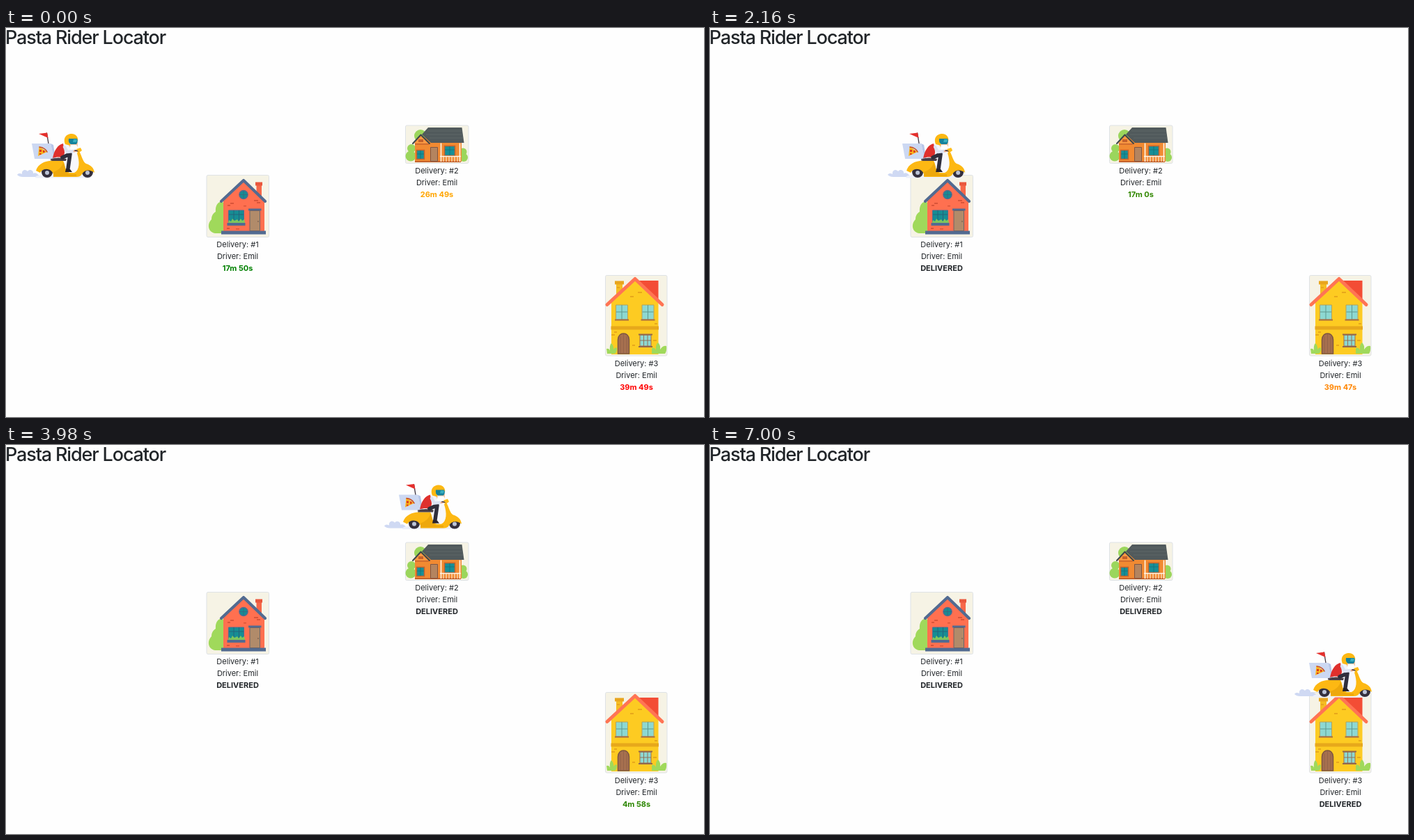
Animation, 1002 px wide and 559 px high, one loop 7350 ms. Source, as an HTML page:

```html
<!DOCTYPE html>
<html lang="en">
<head>
<meta charset="utf-8">
<title>Pasta Rider Locator</title>
<style>
html, body { margin: 0; width: 100%; height: 100%; overflow: hidden; background: #fefefe; }
svg { display: block; width: 1002px; height: 559px; }
text { font: 11px Inter, "Open Sans", sans-serif; fill: #212529; text-anchor: middle; }
#title { font-size: 27px; font-weight: 500; letter-spacing: -1.15px; text-anchor: start; }
.status { font-weight: 700; }
.card { fill: #f6f3e5; stroke: #dee2e6; }
.line { fill: none; stroke-linecap: round; stroke-linejoin: round; }
</style>
</head>
<body>
<svg viewBox="0 0 1002 559">
  <text id="title" x="-1" y="23">Pasta Rider Locator</text>

  <g id="house1">
    <rect class="card" x="288" y="211.500" width="89.500" height="89" rx="2"/>
    <path fill="#a0d95b" d="M300 295C290 293 288 282 295 275C295 269 298 266 301 264C300 255 305 248 311 250L315 255V295Z"/>
    <path fill="#f76849" d="M359.500 226H367V245L359.500 239Z"/>
    <path fill="#e9573c" d="M358 221.500h10v5h-10Z"/>
    <path fill="#ff7050" d="M312 293V247L341 219L371 247V293Z"/>
    <path class="line" stroke="#526b91" stroke-width="4.200" stroke-linecap="butt" d="M309 249L341 219L372 249"/>
    <circle cx="341" cy="239.500" r="6" fill="#168d94" stroke="#526b91" stroke-width="1.600"/>
    <path stroke="#3c6580" stroke-width=".8" d="M341 234v11M335 239.500h12"/>
    <path fill="#168d94" stroke="#526b91" d="M319.500 262h22v18h-22Z"/>
    <path stroke="#23647a" stroke-width="1" d="M327 262v18M334.500 262v18M320 268h21"/>
    <path fill="#7fc65c" d="M319 280l1-4 3 2 2-4 3 3 4-2 2 3 3-4 2 3 3-2 1 5Z"/>
    <path fill="#526b91" d="M317.500 280h26v4h-26ZM348 259.500h18.500v3h-18.500ZM309 291.500h64v5h-64Z"/>
    <path fill="#b18b6a" stroke="#6c6267" d="M350 262.500h14.500v29H350Z"/>
    <path fill="#d9553a" d="M322 251h5v2h-5ZM318 254h4v2h-4ZM356 247h6v2h-6ZM360 250h5v2h-5ZM330 288h5v1.500h-5ZM317 287h4v2h-4ZM341 255h4v1.500h-4Z"/>
    <circle cx="362" cy="278" r=".8" fill="#5d4b44"/>
  </g>

  <g id="house2">
    <rect class="card" x="573.500" y="140" width="90.500" height="54.500" rx="2"/>
    <g fill="#9bd65c">
      <circle cx="595" cy="155" r="9"/><circle cx="582" cy="173" r="6"/>
      <circle cx="581" cy="184" r="7.500"/><circle cx="656" cy="178" r="5.500"/><circle cx="657" cy="186" r="6"/>
    </g>
    <path fill="#f18a32" d="M587 192V164L595 154L610 162H654V192Z"/>
    <path fill="#515a5c" d="M606 143H654.500L657.500 165H610L597 153Z"/>
    <path stroke="#687072" stroke-width=".5" d="M605 148h50M603 153h52M608 158h48"/>
    <path fill="#f99842" d="M586 166L595.500 155L607 166Z"/>
    <path class="line" stroke="#3e474b" stroke-width="2" d="M584 166L595.500 153.500L608 166"/>
    <path fill="#c5622c" d="M592 160h7v4h-7ZM587 166h20v1.500h-20ZM587 191h66v2h-66Z"/>
    <path fill="#178f98" stroke="#c5622c" stroke-width="1.500" d="M589.500 175.500h11v13h-11ZM629.500 169.500h15v14h-15Z"/>
    <path stroke="#166f78" stroke-width=".8" d="M595 176v12M590 181h10M637 170v13M630 175h14"/>
    <path fill="#b4845f" stroke="#7c5544" d="M609.500 171.500h10v20h-10Z"/>
    <path stroke="#fff7e8" stroke-width="1.600" d="M624.500 165.500v26.500M651.500 165.500v26.500M623 184.500h30"/>
    <path stroke="#fff7e8" stroke-width="1" d="M628 185v7M632 185v7M636 185v7M640 185v7M644 185v7M648 185v7"/>
  </g>

  <g id="house3">
    <rect class="card" x="860.500" y="355.500" width="88.500" height="115.500" rx="2"/>
    <path fill="#f6bd22" d="M876 368h9v20h-9Z"/>
    <path fill="#e8a51e" d="M874 363.500h13v5h-13ZM877 372h4v2h-4ZM880 378h4v2h-4Z"/>
    <path fill="#f34d35" d="M903 363H936.500V394H930Z"/>
    <path fill="#fdcb22" d="M869 469V393L903 361L936.500 393V469Z"/>
    <path class="line" stroke="#ff7454" stroke-width="5" stroke-linecap="butt" d="M863 397.500L903 360.500L942 397.500"/>
    <path fill="#e7a81b" d="M868.500 428.500h68.500v5h-68.500ZM907 379h6v2h-6ZM896 385h5v2h-5ZM869 440h5v2h-5ZM873 436h4v2h-4ZM929 448h5v2h-5ZM899 455h4v2h-4ZM931 424h4v2h-4Z"/>
    <g id="pane">
      <path fill="#8dd8d2" stroke="#b3a25a" d="M875.500 398h17v21h-17Z"/>
      <path stroke="#5f988d" d="M884 398v21M876 408h16"/>
      <path stroke="#a66d44" stroke-width="2" d="M874 419.500h20"/>
    </g>
    <use href="#pane" x="37.500"/>
    <path fill="#a6704f" stroke="#7d5542" stroke-width="1.500" d="M878.500 468V448C878.500 436 894.500 436 894.500 448V468Z"/>
    <path stroke="#885b45" stroke-width=".6" d="M882 443v25M886.500 440v28M891 443v25"/>
    <path fill="#8dd8d2" stroke="#a66d44" d="M910 441h16v16h-16Z"/>
    <path stroke="#92684d" stroke-width=".9" d="M915.500 441v16M921 441v16M910 449h16"/>
    <path stroke="#92684d" stroke-width="2" d="M908 440.500h20M908 458h20"/>
    <path fill="#a0d95b" d="M863 468L862 461Q866 460 867 464Q866 456 869 453Q873 457 872 462Q875 458 877 460Q877 466 874 468ZM927 468L927 460Q931 458 933 463Q932 455 936 452Q940 456 939 462Q943 456 948 457Q949 464 946 468Z"/>
  </g>

  <g id="labels"></g>

  <g id="scooter">
    <path fill="#cfd9f3" d="M16 211C18 208 21 209 23 210C22 204 28 202 31 206C34 202 40 205 39 209C43 207 46 210 49 214H24Q19 214 16 211Z"/>
    <path fill="#edf0fa" d="M42 215.500Q42 211.500 50 211.500H118Q123 212 122 215.500Z"/>
    <path class="line" stroke="#3c3542" stroke-width="1.300" d="M58.500 151L66 196"/>
    <path fill="#e5302d" d="M47 152L59 150.500L60.500 158Z"/>
    <path fill="#ccd8f2" d="M37 166H64L69 188H41Z"/>
    <path fill="#b7c6e9" d="M64 166L68 168L71 187L69 188Z"/>
    <path fill="#f9b51c" d="M47.500 170.500L59 178L46 184Z"/>
    <path class="line" stroke="#ca4d20" stroke-width="1.600" d="M48 171Q56 172 59 178"/>
    <path fill="#db3521" d="M48 175h3v3h-3ZM53 176h2.500v3H53ZM48 180h2.500v2H48Z"/>

    <circle cx="59" cy="207" r="8" fill="#34303d"/>
    <circle cx="117" cy="207" r="8" fill="#34303d"/>
    <g fill="#bcc4d8"><circle cx="59" cy="208" r="3"/><circle cx="117" cy="208" r="3"/></g>
    <path fill="#f8f8fd" d="M82 189L94 177H103L109 200L104 208H88Z"/>
    <path fill="#fdb813" d="M43 205C46 195 57 190 69 191H82C86 197 83 204 91 208H98C106 204 106 192 102 180L105 177C109 184 110 192 115 195C122 197 126 201 127 208C121 203 113 203 109 210Q107 214 101 214H68C70 204 55 198 49 208Z"/>
    <path fill="#eda80c" d="M68 207C76 204 81 199 82 193C86 199 84 207 91 210H101V213H68Z"/>
    <path class="line" stroke="#fdb813" stroke-width="3" d="M104 178L109 195"/>
    <path fill="#4a4048" d="M65 188Q75 185 87 188L86 191H66Z"/>

    <path fill="#df302d" d="M67 187C69 176 74 168 82 166L86 172L82 187C77 185 73 185 67 187Z"/>
    <path fill="#f3f4fb" d="M82 166L90 167L94 178L85 184Z"/>
    <path class="line" stroke="#302f3d" stroke-width="5.500" d="M81 186L92 181L89 202"/>
    <path fill="#27222b" d="M86 202L92 203L95 207H85Z"/>
    <path class="line" stroke="#dce3f4" stroke-width="4.500" d="M84 171L88 178L97 177"/>
    <path class="line" stroke="#f5b08b" stroke-width="3" d="M98 177L102 176"/>
    <path class="line" stroke="#353340" stroke-width="1.500" d="M99 176L105 177"/>
    <path fill="#ffbd19" d="M101 174L107 172L109 176L105 179Z"/>
    <path fill="#f7c6a6" d="M90 164H103V171L98 174L91 171Z"/>
    <path fill="#fff" d="M93 168H101L103 171L98 175L92 172Z"/>
    <path fill="#fdb813" d="M85 167C81 157 88 152 94 152C101 152 104 158 103 162H92V169Z"/>
    <path fill="#15829c" d="M90 159H102Q104 163 101 167H93Q89 165 90 159Z"/>
    <path fill="#38afc1" d="M97 160H102L101 164H96Z"/>
  </g>
</svg>

<script>
const LOOP = 7350, RIDE = 1500, FADE = 2000;
const departures = [1150, 2920, 5020];
const stops = [[0, 0], [257.5, 0], [543, -100], [823, 147]];
const red = [255, 0, 0], orange = [255, 165, 0], green = [0, 128, 0];

// Each delivery: label position, timer texts by start time, colour per leg.
const deliveries = [
  { x: 332.5, y: 315, timer: [[0, "17m 50s"], [780, "17m 49s"]], colours: [green] },
  { x: 618.5, y: 208.5, timer: [[0, "26m 49s"], [780, "26m 48s"], [1780, "17m 0s"], [2780, "16m 59s"]],
    colours: [orange, green] },
  { x: 905, y: 486, timer: [[0, "39m 49s"], [780, "39m 48s"], [1780, "39m 47s"], [2780, "39m 46s"], [3780, "4m 58s"]],
    colours: [red, orange, green] }
];

const labels = document.getElementById("labels");
const scooter = document.getElementById("scooter");

function addText(x, y, content) {
  const node = document.createElementNS("http://www.w3.org/2000/svg", "text");
  node.setAttribute("x", x);
  node.setAttribute("y", y);
  node.textContent = content;
  return labels.appendChild(node);
}

deliveries.forEach((d, i) => {
  addText(d.x, d.y, "Delivery: #" + (i + 1));
  addText(d.x, d.y + 17, "Driver: Emil");
  d.status = addText(d.x, d.y + 34.25, "");
  d.status.setAttribute("class", "status");
});

// cubic-bezier(.25, .1, .25, 1), solved by bisection
function ease(p) {
  if (p <= 0) return 0;
  if (p >= 1) return 1;
  const curve = (a, b, u) => 3 * a * u * (1 - u) ** 2 + 3 * b * u * u * (1 - u) + u ** 3;
  let low = 0, high = 1;
  for (let i = 0; i < 24; i++) {
    const mid = (low + high) / 2;
    if (curve(.25, .25, mid) < p) low = mid; else high = mid;
  }
  return curve(.1, 1, low);
}

const mix = (a, b, k) => a.map((v, i) => v + (b[i] - v) * k);

function draw(t) {
  const leg = departures.filter(start => t >= start).length;
  const since = leg ? t - departures[leg - 1] : 0;
  const from = Math.max(leg - 1, 0);
  const [x, y] = mix(stops[from], stops[leg], ease(since / RIDE));
  scooter.setAttribute("transform", `translate(${x} ${y})`);

  deliveries.forEach((d, i) => {
    const done = leg > i;
    d.status.textContent = done ? "DELIVERED" : d.timer.filter(([start]) => t >= start).pop()[1];
    d.status.style.fill = done ? "#212529"
      : `rgb(${mix(d.colours[from], d.colours[leg], ease(since / FADE)).map(Math.round)})`;
  });
}

function tick() {
  draw(performance.now() % LOOP);
  requestAnimationFrame(tick);
}
tick();
</script>
</body>
</html>
```
